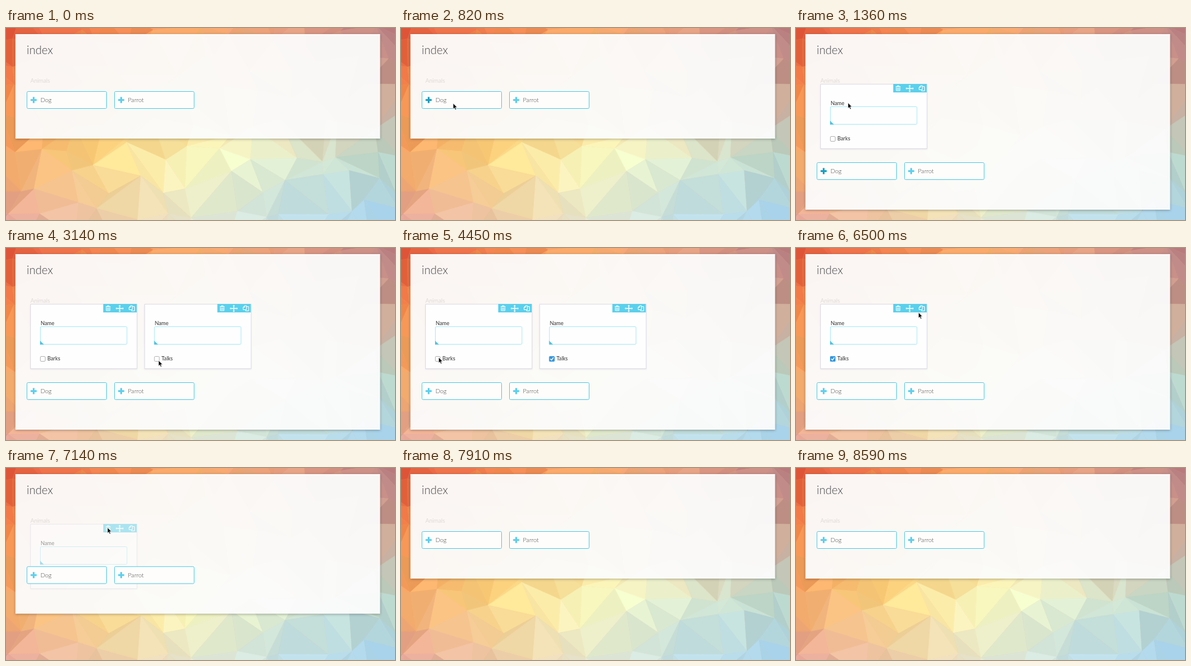
Recreate the animation shown at these times as an HTML page. Size 640 px wide and 316 px high, loop 8630 ms.

```html
<!DOCTYPE html>
<html lang="en">
<head>
<meta charset="utf-8">
<title>index</title>
<style>
html, body { margin: 0; width: 100%; height: 100%; overflow: hidden; background: #f5c07c; }
svg { display: block; }
text { font-family: Lato, sans-serif; font-weight: 300; font-size: 10px; fill: #444; }
.label { font-size: 8.7px; font-weight: 400; fill: #333; }
.button rect { fill: #fffdfc; stroke: #52cbe8; }
.panel { fill: #fff; fill-opacity: .94; filter: drop-shadow(0 1px 2px rgba(0, 0, 0, .32)); }
.frame { fill: #fffeff; stroke: #dfdde8; filter: drop-shadow(0 1px 1px rgba(90, 80, 120, .12)); }
</style>
</head>
<body>
<svg width="640" height="316" viewBox="0 0 640 316">
  <defs>
    <g id="card">
      <rect class="frame" x=".5" y=".5" width="175" height="106"/>
      <path d="M120 0H175V14H120Z" fill="#5bd0ec"/>
      <g fill="none" stroke="#fff">
        <path d="M124 4.5H132M126.5 4V3H129.500V4M125 5.500V11H131V5.500M127 6V10M129 6V10"/>
        <path d="M142 7.500H152M147 2.500V12.500" stroke-width="1.300"/>
        <path d="M162.500 9.500V5.500L165 3H168V9.500ZM162.500 5.500H165V3M166.500 9.500V11.500H171.500V4.500H168"/>
      </g>
      <path d="M142 5.500V9.500L140.500 7.500ZM152 5.500V9.500L153.500 7.500ZM145 3.500H149L147 1.500ZM145 11.500H149L147 13.500Z" fill="#fff"/>
      <text class="label" x="17" y="35.300">Name</text>
      <rect x="16.500" y="37.500" width="142.500" height="29" rx="1.500" fill="#fffeff" stroke="#a9e9f4"/>
      <path d="M16 60.500L22.500 67H16Z" fill="#4fc5e4"/>
      <rect x="16.500" y="86.500" width="8" height="8" rx="1.500" fill="#fff" stroke="#b5b5b5"/>
    </g>
    <g id="check">
      <rect x="16" y="86" width="9" height="9" rx="1.500" fill="#3498e0"/>
      <path d="M18 90.500L20 92.500L23.200 88.200" fill="none" stroke="#fff" stroke-width="1.300"/>
    </g>
    <path id="plus" d="M-5 -1.500H-1.500V-5H1.500V-1.500H5V1.500H1.500V5H-1.500V1.500H-5Z"/>
  </defs>
  <g id="mesh"></g>
  <rect id="panel" class="panel" x="15.500" y="10" width="600" height="172"/>
  <text x="34" y="43" style="font-size:18.700px">index</text>
  <text x="40.300" y="89.500" style="font-size:9.500px;fill:#c9c4c3">Animals</text>
  <g id="dog">
    <use href="#card"/>
    <use id="barks" href="#check"/>
    <text class="label" x="28" y="93.300">Barks</text>
  </g>
  <g id="parrot">
    <use href="#card"/>
    <use id="talks" href="#check"/>
    <text class="label" x="28" y="93.300">Talks</text>
  </g>
  <g id="buttons">
    <g class="button">
      <rect x="34.500" y="104.500" width="131" height="28" rx="2"/>
      <use id="dogPlus" href="#plus" x="45.500" y="118.500"/>
      <text x="56.700" y="122.300">Dog</text>
    </g>
    <g class="button">
      <rect x="178.500" y="104.500" width="131" height="28" rx="2"/>
      <use id="parrotPlus" href="#plus" x="189.500" y="118.500"/>
      <text x="200.500" y="122.300">Parrot</text>
    </g>
  </g>
  <path id="cursor" d="M0 0V9.300L2.100 7.400L3.600 10.800L5.200 10.100L3.700 6.800H6.600Z" fill="#000" stroke="#fff" stroke-width=".7"/>
</svg>
<script>
const LOOP = 8630;
const el = id => document.getElementById(id);
const clamp = v => Math.min(1, Math.max(0, v));
const lerp = (a, b, k) => a + (b - a) * k;
const ease = (t, from, to) => {
  const k = clamp((t - from) / (to - from));
  return k * k * (3 - 2 * k);
};
const show = (id, on) => el(id).setAttribute('visibility', on ? 'visible' : 'hidden');
const move = (id, x, y) => el(id).setAttribute('transform', `translate(${x} ${y})`);

// Low-poly backdrop: a jittered grid coloured from a coarse palette.
const palette = [
  'e5593f f0834e f3a368 e09a80 b87a80',
  'ef8245 f8ad5a fbc97a e8c29a c59c8e',
  'f4aa68 fcdc86 fcfdc2 dbebd2 b9d3c4',
  'e6a498 efcca4 e2e6d0 bfdfe9 a0cbe3'
].map(row => row.split(' ').map(hex =>
  [0, 2, 4].map(i => parseInt(hex.slice(i, i + 2), 16))));

let seed = 17;
const random = () => (seed = seed * 16807 % 2147483647) / 2147483647;

function shade(x, y) {
  const u = clamp(x / 640) * 3.999, v = clamp(y / 316) * 2.999;
  const c = Math.floor(u), r = Math.floor(v);
  const tint = (random() - .5) * 18;
  return 'rgb(' + [0, 1, 2].map(i => Math.round(tint + lerp(
    lerp(palette[r][c][i], palette[r][c + 1][i], u - c),
    lerp(palette[r + 1][c][i], palette[r + 1][c + 1][i], u - c), v - r))) + ')';
}

function buildMesh() {
  const cols = 15, rows = 8, w = 50, h = 48;
  const points = Array.from({ length: rows + 1 }, (_, r) =>
    Array.from({ length: cols + 1 }, (_, c) =>
      [(c - .8 + (random() - .5) * .85) * w, (r - .7 + (random() - .5) * .85) * h]));
  const triangle = tri => {
    const mid = i => (tri[0][i] + tri[1][i] + tri[2][i]) / 3;
    const fill = shade(mid(0), mid(1));
    return `<polygon points="${tri.join(' ')}" fill="${fill}" stroke="${fill}" stroke-width=".6"/>`;
  };
  let out = '';
  for (let r = 0; r < rows; r++) for (let c = 0; c < cols; c++) {
    const a = points[r][c], b = points[r][c + 1];
    const d = points[r + 1][c], e = points[r + 1][c + 1];
    const pair = random() < .5 ? [[a, b, d], [b, e, d]] : [[a, b, e], [a, e, d]];
    out += pair.map(triangle).join('');
  }
  el('mesh').innerHTML = out;
}

// Pointer stops: arrival time, departure time, x, y.
const stops = [
  [150, 150, 150, 318], [850, 1480, 85.500, 123], [2000, 2450, 215, 234],
  [3000, 3650, 251, 185], [4300, 4650, 62, 180], [5250, 5700, 167, 98],
  [6200, 6550, 201.500, 106], [6900, 7200, 167, 98], [7700, 7700, 330, 320]
];

function pointer(t) {
  let i = 0;
  while (i < stops.length - 2 && t >= stops[i + 1][0]) i++;
  const [, leave, x, y] = stops[i], [arrive, , nx, ny] = stops[i + 1];
  const k = ease(t, leave, arrive);
  return [lerp(x, nx, k), lerp(y, ny, k)];
}

function draw(t) {
  const dogIn = ease(t, 980, 1220), dogOut = ease(t, 5380, 5620);
  const parrotIn = ease(t, 2140, 2360), parrotOut = ease(t, 7020, 7260);
  const dog = dogIn * (1 - dogOut), parrot = parrotIn * (1 - parrotOut);
  const grow = 117 * dogIn * (1 - parrotOut);

  el('panel').setAttribute('height', 172 + grow);
  move('buttons', 0, grow);
  move('dog', 40, 92);
  move('parrot', lerp(227.700, 40, dogOut), 92);
  el('dog').setAttribute('opacity', dog);
  el('parrot').setAttribute('opacity', parrot);
  show('barks', t > 4540);
  show('talks', t > 3280);

  const hover = (id, on) => el(id).setAttribute('fill', on ? '#159fc2' : '#5bd0ee');
  hover('dogPlus', t > 770 && t < 1520);
  hover('parrotPlus', t > 1880 && t < 2570);

  show('cursor', t > 150 && t < 7700);
  move('cursor', ...pointer(t));
}

buildMesh();
const start = performance.now();
function tick() {
  draw((performance.now() - start) % LOOP);
  requestAnimationFrame(tick);
}
tick();
</script>
</body>
</html>
```
